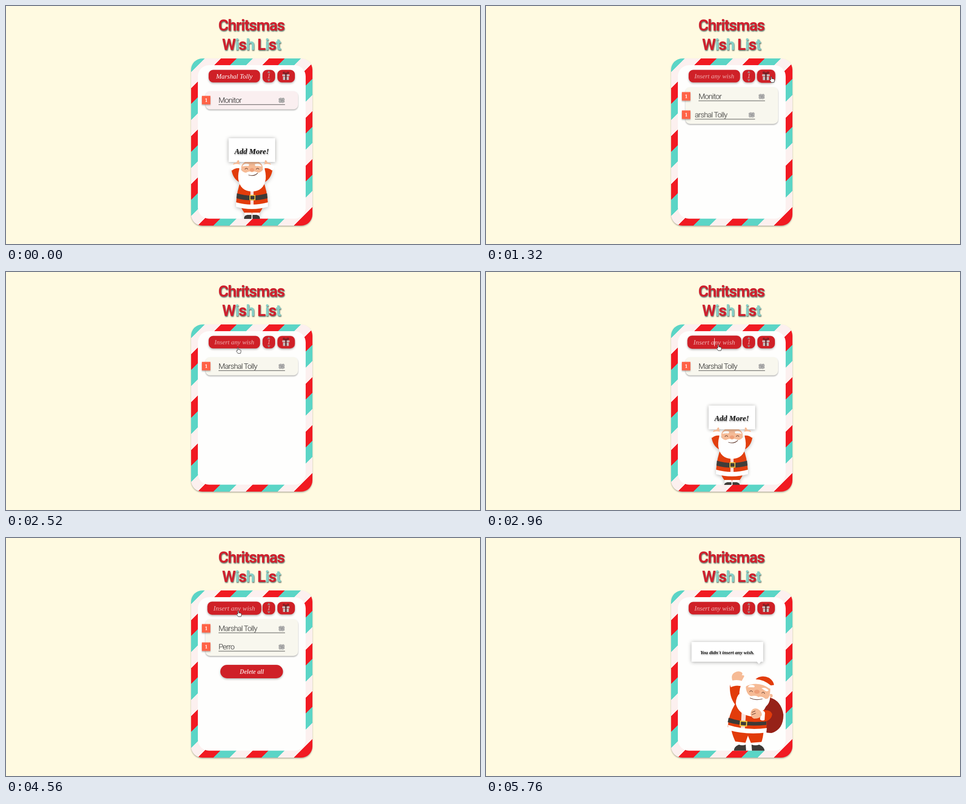
Recreate the animation shown at these times as an HTML page. Size 1055 px wide and 531 px high, loop 6.02 s.

```html
<!DOCTYPE html>
<html lang="en">
<head>
<meta charset="utf-8">
<title>Wish list</title>
<style>
html, body { margin: 0; width: 100%; height: 100%; overflow: hidden; background: #fffae1; }
svg { display: block; width: 1055px; height: 531px; }
text { text-anchor: middle; }

.title { font: 700 35px Roboto, "Open Sans", sans-serif; letter-spacing: -1.6px; fill: #d0202d; filter: drop-shadow(1px 2px 1px #5d7268); }
.title .mint { fill: #87cfc6; }
.script { font: italic 14.5px "Liberation Serif", "Noto Serif", serif; fill: #fff; }
.bold { font-weight: 700; }
.hint { fill: #f0b4b5; }
.button { fill: #cf2027; filter: drop-shadow(0 2px 2px rgba(0,0,0,.3)); }
.lift { filter: drop-shadow(0 2px 1.5px rgba(0,0,0,.3)); }
.wish { font: 300 17px Roboto, "Open Sans", sans-serif; letter-spacing: -1px; text-anchor: start; fill: #222; }
.count { font: 700 10px "Noto Serif", serif; fill: #fff; }
.sign { fill: #fff; filter: drop-shadow(0 1px 4px rgba(0,0,0,.35)); }
.ink { fill: #111; filter: drop-shadow(1px 2px 1px rgba(0,0,0,.35)); }
.coat { fill: #e23c0b; }
.skin { fill: #f6bb96; }
.fur { fill: #fff; }
.dark { fill: #3d3a37; }
.line { fill: none; stroke: #5b3326; stroke-width: 1.2; stroke-linecap: round; }
.figure { filter: drop-shadow(0 2px 4px rgba(0,0,0,.25)); }

/* One shared 6.02 s clock */
.run { animation: 6.02s linear infinite; }
.step { animation: 6.02s step-end infinite; }
.grow { transform-box: fill-box; transform-origin: center; }

.typed { animation-name: typed; }
.prompt { animation-name: prompt; }
.p1 { animation-name: p1; }
.p2 { animation-name: p2; }
.p3 { animation-name: p3; }
.p4 { animation-name: p4; }
.p5 { animation-name: p5; }
.caret { animation-name: caret; }
@keyframes typed { 0% { opacity: 1 } 11.63%, 100% { opacity: 0 } }
@keyframes prompt { 0% { opacity: 0 } 11.63% { opacity: 1 } 50.5% { opacity: 0 } 62.79%, 100% { opacity: 1 } }
@keyframes p1 { 0% { opacity: 0 } 50.5% { opacity: 1 } 53.49%, 100% { opacity: 0 } }
@keyframes p2 { 0% { opacity: 0 } 53.49% { opacity: 1 } 54.82%, 100% { opacity: 0 } }
@keyframes p3 { 0% { opacity: 0 } 54.82% { opacity: 1 } 56.15%, 100% { opacity: 0 } }
@keyframes p4 { 0% { opacity: 0 } 56.15% { opacity: 1 } 57.48%, 100% { opacity: 0 } }
@keyframes p5 { 0% { opacity: 0 } 57.48% { opacity: 1 } 62.79%, 100% { opacity: 0 } }
@keyframes caret { 0% { opacity: 0 } 46.51% { opacity: 1 } 50.5%, 100% { opacity: 0 } }

.field { animation-name: field; }
.gift { animation-name: gift; }
@keyframes field { 0%, 42.86% { transform: scale(1) } 44.85%, 77.08% { transform: scale(1.05) } 79%, 100% { transform: scale(1) } }
@keyframes gift { 0%, 10% { transform: scale(1) } 11.6%, 23% { transform: scale(1.05) } 25%, 100% { transform: scale(1) } }

.small { animation-name: small; }
.large { animation-name: large; }
@keyframes small { 0% { opacity: 1; fill: #faeff0 } 11.63% { opacity: 0; fill: #f8f7ee } 36.5% { opacity: 1; fill: #f8f7ee } 62.79%, 100% { opacity: 0; fill: #f8f7ee } }
@keyframes large { 0% { opacity: 0 } 11.63% { opacity: 1 } 36.5% { opacity: 0 } 62.79% { opacity: 1 } 84.05%, 100% { opacity: 0 } }

.row1 { animation-name: row1, fade1; animation-timing-function: step-end, linear; }
.row2 { animation-name: row2, fade2; animation-timing-function: step-end, linear; }
.row3 { animation-name: fade3; transform: translateY(242.5px); }
@keyframes row1 { 0% { transform: translateY(210px) } 11.63%, 100% { transform: translateY(201.5px) } }
@keyframes row2 { 0% { transform: translateY(242.5px) } 36.5% { transform: translateY(210px) } 62.79%, 100% { transform: translateY(201.5px) } }
@keyframes fade1 { 0%, 32.56% { opacity: 1 } 35.88%, 100% { opacity: 0 } }
@keyframes fade2 { 0%, 11.62% { opacity: 0 } 11.63%, 82.39% { opacity: 1 } 84.05%, 100% { opacity: 0 } }
@keyframes fade3 { 0%, 62.78% { opacity: 0 } 62.79%, 82.39% { opacity: 1 } 84.05%, 100% { opacity: 0 } }

.in2 { animation-name: in2; }
.in3 { animation-name: in3; }
@keyframes in2 { 0%, 17.94% { transform: translateX(-180px); animation-timing-function: cubic-bezier(.215,.61,.355,1) } 25.91%, 100% { transform: none } }
@keyframes in3 { 0%, 66.45% { transform: translateX(-180px); animation-timing-function: cubic-bezier(.215,.61,.355,1) } 73.09%, 100% { transform: none } }

.clear { animation-name: clear; }
@keyframes clear { 0%, 25.91% { opacity: 0 } 29.9%, 32.56% { opacity: 1 } 35.88%, 71.43% { opacity: 0 } 75.08%, 82.39% { opacity: 1 } 84.05%, 100% { opacity: 0 } }

.holder { animation-name: holder; }
@keyframes holder {
  0%, 11.63% { transform: none; opacity: 1; animation-timing-function: ease-in }
  18.5%, 42.86% { transform: translateY(190px); opacity: 0; animation-timing-function: cubic-bezier(.215,.61,.355,1) }
  50.83%, 62.5% { transform: none; opacity: 1; animation-timing-function: ease-in }
  70.27%, 100% { transform: translateY(190px); opacity: 0 }
}

.waver { animation-name: rise, appear; }
.notice { animation-name: slide, appear; }
@keyframes rise { 0%, 86.79% { transform: translateY(200px); animation-timing-function: cubic-bezier(.215,.61,.355,1) } 95.43%, 100% { transform: none } }
@keyframes slide { 0%, 86.79% { transform: translateX(-200px); animation-timing-function: cubic-bezier(.215,.61,.355,1) } 95.43%, 100% { transform: none } }
@keyframes appear { 0%, 86.79% { opacity: 0 } 89.37% { opacity: .87 } 95.43%, 100% { opacity: 1 } }

.pointer { animation-name: pointer; }
.hand { animation-name: hand; }
.arrow { animation-name: arrow; }
@keyframes pointer {
  0%, 1.66% { transform: translate(1062px,5px) }
  6.64% { transform: translate(724px,50px) }
  10.63%, 22.9% { transform: translate(635px,157px) }
  31.56%, 34.5% { transform: translate(613px,200px) }
  41.86% { transform: translate(516px,168px) }
  44.85%, 77.08% { transform: translate(517px,162px) }
  82%, 84.5% { transform: translate(556px,300px) }
  89.37% { transform: translate(681px,317px) }
  92.7%, 100% { transform: translate(1062px,319px) }
}
@keyframes hand { 0% { opacity: 0 } 9.97% { opacity: 1 } 23.92% { opacity: 0 } 30.56% { opacity: 1 } 35.88% { opacity: 0 } 41.2% { opacity: 1 } 77.74% { opacity: 0 } 80.4% { opacity: 1 } 85.38%, 100% { opacity: 0 } }
@keyframes arrow { 0% { opacity: 1 } 9.97% { opacity: 0 } 23.92% { opacity: 1 } 30.56% { opacity: 0 } 35.88% { opacity: 1 } 41.2% { opacity: 0 } 77.74% { opacity: 1 } 80.4% { opacity: 0 } 85.38%, 100% { opacity: 1 } }
</style>
</head>
<body>
<svg viewBox="0 0 1055 531">
  <defs>
    <linearGradient id="candy" gradientUnits="userSpaceOnUse" x1="279.7" y1="279.7" x2="333.2" y2="333.2" spreadMethod="repeat">
      <stop offset="0" stop-color="#fcf0ef"/><stop offset=".333" stop-color="#fcf0ef"/>
      <stop offset=".333" stop-color="#f11a22"/><stop offset=".667" stop-color="#f11a22"/>
      <stop offset=".667" stop-color="#5bd5c6"/><stop offset="1" stop-color="#5bd5c6"/>
    </linearGradient>
    <clipPath id="paper"><rect x="427" y="132" width="240" height="342.5" rx="25"/></clipPath>
    <clipPath id="lane"><rect x="465" y="-20" width="185" height="40"/></clipPath>
    <g id="badge">
      <rect class="lift" x="436" y="-9.5" width="19" height="19" fill="#ff6347"/>
      <text class="count" x="445.5" y="3.5">1</text>
    </g>
    <g id="rule">
      <path d="M473 10H621" stroke="#333"/>
      <path d="M607-3l4-2 3 1 4-1 2 3-1 3 1 3-4 2-4-1-3 1-2-3 1-2z" fill="#b4b4b4" stroke="#8b8b8b" stroke-width=".7"/>
      <path d="M609-2l4 2 4-3M612 4l2-3 4 1" fill="none" stroke="#777" stroke-width=".8"/>
    </g>
    <g id="limb">
      <path class="coat" d="M502 366Q511 360 519 361Q518 370 528 376L521 394Q505 386 502 366Z"/>
      <path class="coat" d="M523 448H548V464H533Q527 458 523 448Z"/>
      <path class="fur" d="M531 461H547V467H531Z"/>
      <path class="dark" d="M530 475Q529 468 537 466H546V475Z"/>
    </g>
    <g id="palm">
      <path class="skin" d="M505 357Q505 348 512 350L516 344Q520 343 519 350L521 356Z"/>
      <path class="fur" d="M499 357Q509 351 519 353Q524 357 520 362Q510 361 503 367Q497 363 499 357Z"/>
    </g>
    <g id="brow">
      <path class="fur" d="M526 358Q530 349 541 353Q542 358 536 357Q530 357 526 358Z"/>
      <path class="line" d="M532 364q3-4 6 0"/>
    </g>
  </defs>

  <g class="title">
    <text x="546" y="55">Chritsmas</text>
    <text x="546" y="98">W<tspan class="mint">i</tspan>s<tspan class="mint">h</tspan> L<tspan class="mint">i</tspan>s<tspan class="mint">t</tspan></text>
  </g>

  <rect class="lift" x="412" y="117" width="270" height="373" rx="25" fill="url(#candy)"/>
  <rect x="427" y="132" width="240" height="342.5" rx="25" fill="#fefefd"/>

  <g class="run grow field">
    <rect class="button" x="451" y="142.5" width="114.5" height="28" rx="10"/>
    <g class="script">
      <text class="step typed" x="508" y="161.5">Marshal Tolly</text>
      <text class="step prompt hint" x="508" y="161.5">Insert any wish</text>
      <text class="step p1" x="508" y="161.5">P</text>
      <text class="step p2" x="508" y="161.5">Pe</text>
      <text class="step p3" x="508" y="161.5">Per</text>
      <text class="step p4" x="508" y="161.5">Perr</text>
      <text class="step p5" x="508" y="161.5">Perro</text>
    </g>
    <rect class="step caret" x="508" y="148" width="1" height="17" fill="#fff"/>
  </g>
  <rect class="button" x="571" y="142.5" width="28" height="28" rx="10"/>
  <text class="script hint" x="585" y="161">1</text>
  <path d="M581.5 149.5l3.500-5 3.500 5zM581.5 163.5l3.500 5 3.500-5z" fill="#a08484"/>
  <g class="run grow gift">
    <rect class="button" x="604" y="142.5" width="39" height="28" rx="10"/>
    <path d="M615 152.500H631V156.500H615ZM616.500 157.500H629.500V165H616.500Z" fill="#c9c0c0"/>
    <path d="M621.500 152.500H624.500V165H621.500Z" fill="#5c2024"/>
    <path d="M623 152q-7-1-6-4 3-2 6 4 3-6 6-4 1 3-6 4z" fill="none" stroke="#5c2024" stroke-width="1.500"/>
  </g>

  <rect class="lift step small" x="444" y="190" width="206" height="40.5" rx="10"/>
  <rect class="lift step large" x="444" y="181" width="206" height="82" rx="10" fill="#f8f7ee"/>
  <g class="run row1">
    <use href="#badge"/><use href="#rule"/>
    <text class="wish" x="473" y="6">Monitor</text>
  </g>
  <g class="run row2">
    <use href="#badge"/>
    <g clip-path="url(#lane)"><g class="run in2">
      <use href="#rule"/><text class="wish" x="473" y="6">Marshal Tolly</text>
    </g></g>
  </g>
  <g class="run row3">
    <use href="#badge"/>
    <g clip-path="url(#lane)"><g class="run in3">
      <use href="#rule"/><text class="wish" x="473" y="6">Perro</text>
    </g></g>
  </g>

  <g class="run clear">
    <rect class="button" x="477" y="283" width="139.5" height="30" rx="15"/>
    <text class="script bold" x="547" y="302.5" style="font-size:13.8px;fill:#f5cfcf">Delete all</text>
  </g>

  <g clip-path="url(#paper)">
    <g class="run holder">
      <g class="figure">
        <use href="#limb"/><use href="#limb" transform="matrix(-1 0 0 1 1095 0)"/>
        <path class="coat" d="M523 390Q514 410 512 441Q547 449 583 441Q581 410 572 390Z"/>
        <path d="M544 405H551V444H544Z" fill="#f9e0db"/>
        <path class="dark" d="M514 418Q547 428 581 418L582 429Q547 438 513 429Z"/>
        <rect x="543" y="422.5" width="11" height="10" fill="#3d3a37" stroke="#f0c23c" stroke-width="2"/>
        <path class="fur" d="M512 438Q547 448 583 438L583 448Q547 458 512 448Z"/>
        <ellipse class="fur" cx="547.5" cy="356" rx="28" ry="16"/>
        <ellipse class="skin" cx="547.5" cy="361" rx="24" ry="17"/>
        <path class="fur" d="M521 360Q523 370 534 372Q542 367 547.5 371Q553 367 561 372Q572 370 574 360Q579 371 578 386Q574 413 547.5 414Q521 413 517 386Q516 371 521 360Z"/>
        <use href="#brow"/><use href="#brow" transform="matrix(-1 0 0 1 1095 0)"/>
        <ellipse cx="547.5" cy="365.5" rx="5" ry="4" fill="#ee9f78"/>
        <path class="line" d="M540 377Q552 381 560 373"/>
      </g>
      <rect class="sign" x="495.5" y="295" width="103.5" height="53"/>
      <text class="script bold ink" x="547" y="329.5" style="font-size:17px">Add More!</text>
      <use href="#palm"/><use href="#palm" transform="matrix(-1 0 0 1 1095 0)"/>
    </g>

    <g class="run waver">
      <path d="M632 356Q657 363 662 394Q662 427 636 435Q606 437 600 400Q604 367 632 356Z" fill="#962218"/>
      <path class="coat" d="M546 428H618Q617 447 612 458H590L583 441L577 458H557Q549 443 546 428Z"/>
      <path class="fur" d="M555 454L579 457L578 463H558ZM589 457L614 455L613 463H590Z"/>
      <path class="dark" d="M552 475Q551 466 563 461Q571 464 578 461L579 475ZM592 475L591 461Q600 464 608 461Q620 466 620 475Z"/>
      <path class="coat" d="M543 327L568 327Q561 344 566 362L619 380Q627 400 624 427Q580 438 538 422Q540 394 554 371Q541 354 543 327Z"/>
      <path class="skin" d="M549 319Q544 307 552 301Q560 295 568 299Q573 302 569 306Q577 306 574 310L568 321Z"/>
      <path class="fur" d="M545 319Q557 315 570 319Q575 324 570 331Q556 327 545 333Q541 325 545 319Z"/>
      <path d="M569 385L579 387L576 429L567 428Z" fill="#f9e0db"/>
      <path class="dark" d="M540 401Q576 414 624 409L624 417Q576 422 538 411Z"/>
      <rect x="566" y="409" width="14" height="10" fill="#3d3a37" stroke="#f0c23c" stroke-width="2.5" transform="rotate(4 573 414)"/>
      <path class="fur" d="M539 417Q580 430 625 424L624 434Q580 440 538 428Z"/>
      <path class="coat" d="M600 315Q613 304 630 312Q640 319 641 328L633 329Z"/>
      <circle class="skin" cx="634" cy="352" r="4"/>
      <path class="skin" d="M580 328Q605 314 632 331Q635 350 624 364L583 358Q573 344 580 328Z"/>
      <path class="fur" d="M578 331Q574 321 583 318Q610 309 634 329Q637 336 631 336Q606 318 578 331Z"/>
      <path class="fur" d="M578 330Q579 349 590 353Q602 350 606 355Q614 352 622 359Q630 360 632 349Q634 366 623 376Q613 397 589 398Q562 393 556 370Q556 353 567 345Q567 336 578 330Z"/>
      <path class="fur" d="M583 333Q586 325 597 329Q600 334 593 333ZM613 335Q623 332 629 340Q626 344 620 340Z"/>
      <path class="line" d="M587 343q3-5 6 0M614 346q3-5 6 1"/>
      <ellipse cx="603" cy="343" rx="6" ry="4.5" fill="#ee9f78"/>
      <path class="line" d="M588 357Q600 363 615 359"/>
      <path class="coat" d="M616 385Q633 382 637 393Q635 408 617 410Z"/>
      <path class="fur" d="M611 387Q618 383 621 390L620 406Q615 409 610 405Z"/>
      <path class="skin" d="M590 387Q594 378 604 381Q614 386 614 395Q609 404 596 403Q586 397 590 387Z"/>
      <path class="line" d="M592 389l7-3M592 394l8-3" stroke="#d98f68"/>
    </g>

    <g class="run notice">
      <path class="sign" d="M457.5 232H617V276H612L607.5 281L603 276H457.5Z"/>
      <text class="script bold ink" x="537" y="258.5" style="font-size:11px">You didn't insert any wish.</text>
    </g>
  </g>

  <g class="run pointer" stroke="#222" stroke-width=".9" stroke-linejoin="round" fill="#fff">
    <path class="step arrow" d="M0 0V10L2.4 8L4 11.5L5.5 10.8L4 7.5H7Z"/>
    <path class="step hand" d="M-1 1Q0-.5 1 1V5L6 6Q7.5 6.500 7 9L6 13.500H0L-3.500 8.500Q-3 6.500-1 8Z"/>
  </g>
</svg>
</body>
</html>
```
